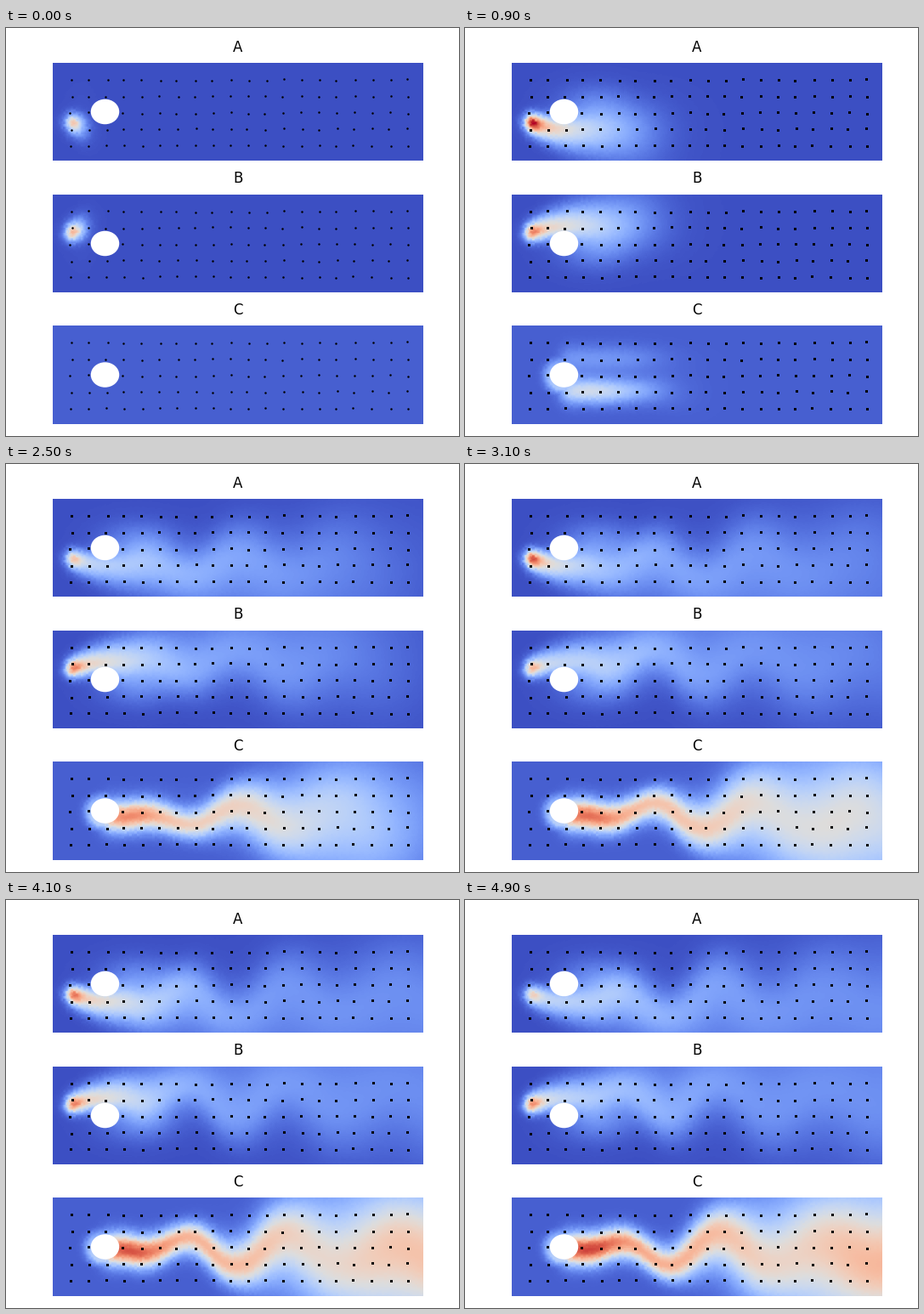
A matplotlib script that plays this animation: 533x480 px, repeating every 5 s.

```python
import numpy as np
import matplotlib.pyplot as plt
from matplotlib.animation import FuncAnimation
from matplotlib.patches import Ellipse

W, H = 533, 480
FRAMES, INTERVAL = 50, 100
LEFT, RIGHT = 55, 491
PANELS = [("A", 41, 156), ("B", 196, 311), ("C", 350, 466)]
PITCH = 154.6  # distance from one panel to the next

rng = np.random.default_rng(4)


def step(v):
    return 0.5 * (1 + np.tanh(v / 2))


def bell(v):
    return np.exp(-0.5 * v ** 2)


def ramp(v):
    """Smooth rise from 0 to 1."""
    v = np.clip(v, 0, 1)
    return v * v * (3 - 2 * v)


def cell_jitter(shape, cell, size):
    """Random offsets, constant over small cells, like a fine mesh."""
    rows, cols = shape
    coarse = rng.uniform(-size, size, (rows // cell + 1, cols // cell + 1))
    return np.kron(coarse, np.ones((cell, cell)))[:rows, :cols]


# Stage x, and y measured downwards from the channel's middle line.
X, Y = np.meshgrid(np.arange(LEFT, RIGHT) + 0.5, np.arange(115) - 57.0)
X = X + cell_jitter(X.shape, 3, 1)
Y = Y + cell_jitter(Y.shape, 3, 1)
RADIUS = np.hypot((X - 116.5) / 16.5, Y / 14.5)


def front(t):
    """Share of the flow already reached by the released species."""
    return 0.5 * (1 - np.tanh(1.2 * (X - 92 - 14.2 * t) / (12 + 3.5 * t)))


def meander(t):
    """Vertical displacement of the vortex street, fading downstream."""
    growth = np.clip((t - 8) / 28, 0, 1)
    reach = 20 * np.clip((X - 140) / 100, 0, 1) * (1 - 0.5 * ramp((X - 280) / 150))
    crest = 255 + 11.5 * (t - 45)
    wall = 1 - 0.7 * np.clip(Y / 62, -1, 1) ** 2
    return -growth * reach * wall * np.cos(2 * np.pi * (X - crest) / 125)


def pulse(t, period, peak, strength):
    return strength * np.cos(2 * np.pi * (t - peak) / period)


def inflow_plume(t, side, *rhythm):
    """Species released below (side 1) or above (side -1) the middle."""
    run = np.maximum(X - 77, 0)
    strength = 1 + pulse(t - run / 14, *rhythm) * np.exp(-run / 120)
    path = 12.5 + 11 * (1 - np.exp(-run / 30))
    off = side * (Y - meander(t)) - path
    width = (7 + 0.11 * run) * np.where(off > 0, 1.3, 1)
    level = 0.15 + 0.4 * np.exp(-(X - 85) / 95)
    plume = level * bell(off / width) * step((X - 73) / 2.5)
    blob = 0.25 * bell((X - 79) / 8) * bell((side * Y - 12.5) / 7)
    wake = 0.13 * bell((X - 155) / 30) * bell((side * Y + 8) / 16)
    return 0.01 + front(t) * (strength * (plume + blob) + wake)


def product_plume(t):
    """Species formed where the two plumes meet behind the cylinder."""
    rise = 1 - np.exp(-t / 15)
    early = np.exp(-(t / 20) ** 2)
    level = rise * (0.7 - 0.14 * bell((X - 375) / 50)
                    + 0.26 * bell((X - 145) / 28))
    path = 3 + 19 * early + 8 * rise * ramp((X - 330) / 120)
    width = (12.5 + 45 * ramp((X - 200) / 260)) * (1 - 0.2 * early)
    lee = step((X - 114) / 4)
    plume = level * bell((Y - meander(t) - path) / width)
    upper = 0.2 * bell((t - 13) / 5) * bell((Y + 18) / 11)
    glow = 0.28 * (1 - np.exp(-t / 4)) * (1 + Y / 50)
    halo = glow * np.exp(-(np.maximum(RADIUS - 1, 0) / 0.5) ** 2)
    halo = halo * step((132 - X) / 5)
    return 0.045 + 0.955 * np.maximum((plume + upper) * lee * front(t), halo)


def fields(t):
    return (inflow_plume(t, 1, 26, 9, 0.28),
            inflow_plume(t, -1, 16, 21, 0.2),
            product_plume(t))


# A slightly irregular grid of probes, without the one inside the cylinder.
col, row = np.meshgrid(np.arange(20), np.arange(5))
keep = ~((col == 2) & (row == 2))
probe_x = np.round(75.5 + 20.83 * col + rng.uniform(-1.5, 1.5, col.shape))[keep]
probe_y = (60.2 + 19.3 * row + rng.uniform(-1, 1, row.shape))[keep]

fig = plt.figure(figsize=(W / 100, H / 100), dpi=100, facecolor="white")
ax = fig.add_axes([0, 0, 1, 1])
ax.axis("off")

images, squares = [], []
for k, ((name, top, bottom), field) in enumerate(zip(PANELS, fields(0))):
    images.append(ax.imshow(field, cmap="coolwarm", vmin=0, vmax=1,
                            extent=(LEFT, RIGHT, bottom, top),
                            interpolation="nearest", aspect="auto"))
    ax.add_patch(Ellipse((116.5, (top + bottom) / 2), 33.5, 29.5,
                         facecolor="white", linewidth=0, zorder=2))
    x, y = probe_x + 0.5, np.round(probe_y + k * PITCH) + 0.5
    style = dict(color="black", mew=0, zorder=3, snap=False)
    ax.plot(x, y, "o", ms=1.8, **style)
    squares += ax.plot(x, y, "s", ms=2.16, **style)
    ax.text(273, round(27.7 + k * PITCH), name, ha="center", va="baseline",
            fontsize=12, family="DejaVu Sans")
ax.set_xlim(0, W)
ax.set_ylim(H, 0)


def update(t):
    for image, field in zip(images, fields(t)):
        image.set_data(field)
    # Probe marks are stamped again each step, so their soft rims fill in.
    for marks in squares:
        marks.set_alpha(1 - 0.6 ** t)
    return images + squares


anim = FuncAnimation(fig, update, frames=FRAMES, interval=INTERVAL,
                     repeat=True, repeat_delay=0, blit=False)
plt.show()
```
